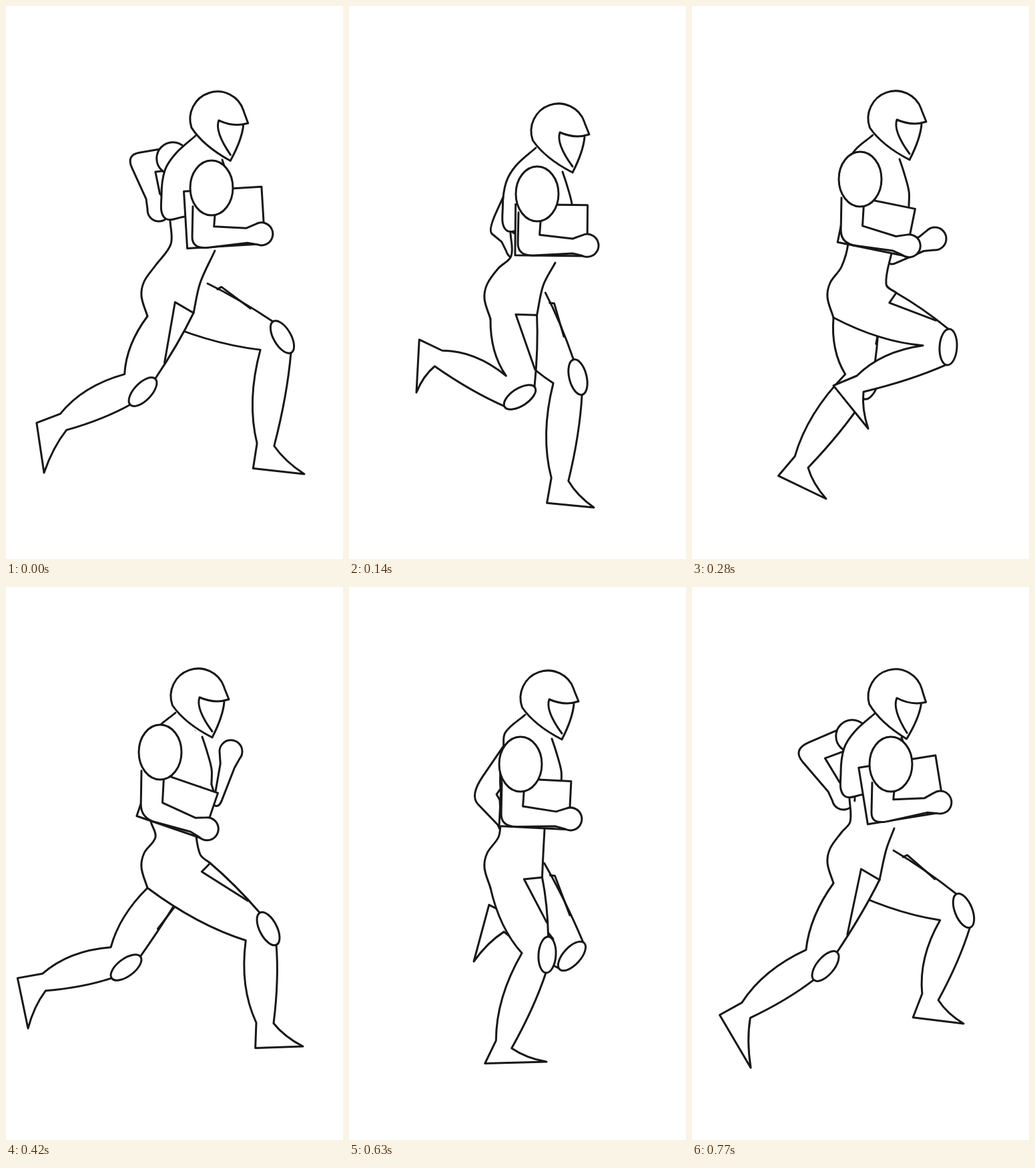
An HTML page with a canvas that plays this animation: 505 by 827 pixels, repeating every 0.84 s.

```html
<!DOCTYPE html>
<html lang="en">
<head>
<meta charset="utf-8">
<title>Run cycle</title>
<style>
html, body { margin: 0; width: 100%; height: 100%; overflow: hidden; background: #fff; }
canvas { display: block; width: 505px; height: 827px; }
</style>
</head>
<body>
<canvas id="stage" width="505" height="827"></canvas>
<script>
const STEP = 70, COUNT = 12, HIP_X = 253;
const ctx = document.getElementById('stage').getContext('2d');

// Key joints by step of the cycle; each leg is knee pad, ankle, toe.
const KEYS = {
  0: { head: [318, 128], shoulder: [308, 272], swing: -.06, hipY: 434, elbow: [203, 236], fist: [229, 305],
    near: [[205, 577], [86, 622], [57, 698]], far: [[414, 495], [389, 656], [447, 700]] },
  2: { head: [314, 146], shoulder: [282, 281], swing: .01, hipY: 438, elbow: [228, 333], fist: [252, 362],
    near: [[256, 585], [134, 527], [101, 578]], far: [[343, 555], [316, 708], [367, 750]] },
  4: { head: [305, 127], shoulder: [252, 259], swing: .2, hipY: 436, elbow: [300, 370], fist: [364, 348],
    near: [[384, 510], [252, 565], [264, 632]], far: [[266, 562], [164, 682], [201, 737]] },
  6: { head: [288, 122], shoulder: [231, 247], swing: .33, hipY: 420, elbow: [314, 325], fist: [337, 246],
    near: [[393, 511], [388, 652], [445, 687]], far: [[180, 569], [57, 591], [33, 660]] },
  7: { head: [292, 130], shoulder: [238, 256], swing: .29, hipY: 427, elbow: [290, 340], fist: [337, 304],
    near: [[373, 537], [389, 690], [458, 704]], far: [[216, 588], [90, 528], [48, 569]] },
  9: { head: [298, 125], shoulder: [257, 265], swing: .05, hipY: 420, elbow: [202, 311], fist: [246, 365],
    near: [[297, 550], [232, 684], [296, 710]], far: [[334, 552], [238, 504], [187, 560]] },
  11: { head: [308, 123], shoulder: [298, 265], swing: -.16, hipY: 413, elbow: [176, 250], fist: [227, 316],
    near: [[200, 567], [81, 633], [88, 719]], far: [[407, 484], [357, 613], [407, 653]] }
};

const clamp = v => Math.min(1, Math.max(0, v));
const add = (a, b, k = 1) => [a[0] + b[0] * k, a[1] + b[1] * k];
const toward = (a, b) => {
  const d = add(b, a, -1), len = Math.hypot(...d) || 1;
  return [d[0] / len, d[1] / len];
};
const unit = v => toward([0, 0], v);
const clockwise = ([x, y]) => [-y, x];
const forward = ([x, y]) => [y, -x];
const lerp = (a, b, t) => add(a, add(b, a, -1), t);
const turn = ([x, y], r) => [x * Math.cos(r) - y * Math.sin(r), x * Math.sin(r) + y * Math.cos(r)];
const halfway = (a, b) => Array.isArray(a) ? lerp(a, b, .5) : (a + b) / 2;

// Steps without keys: the body is halfway, the legs mirror the opposite step.
function poseAt(i) {
  if (KEYS[i]) return KEYS[i];
  const a = KEYS[i - 1], b = KEYS[(i + 1) % COUNT], mirror = KEYS[(i + COUNT / 2) % COUNT];
  const pose = {};
  for (const part of ['head', 'shoulder', 'swing', 'hipY', 'elbow', 'fist']) pose[part] = halfway(a[part], b[part]);
  const shift = [0, pose.hipY - mirror.hipY];
  pose.near = mirror.far.map(p => add(p, shift));
  pose.far = mirror.near.map(p => add(p, shift));
  return pose;
}

function paint(path) {
  ctx.fill(path);
  ctx.stroke(path);
}

function curve(path, pts) {
  pts.forEach((p, i) => {
    if (!i) return path.lineTo(...p);
    const prev = pts[i - 1], len = Math.hypot(...add(p, prev, -1)) * .33;
    const out = toward(pts[i - 2] || prev, p), into = toward(prev, pts[i + 1] || p);
    path.bezierCurveTo(...add(prev, out, len), ...add(p, into, -len), ...p);
  });
  return path;
}

// Line that bows sideways by h.
function bow(path, a, b, h) {
  path.quadraticCurveTo(...add(lerp(a, b, .45), clockwise(toward(a, b)), 2 * h), ...b);
}

// White area between two sides; only the sides are inked.
function panel(back, front) {
  ctx.fill(curve(curve(new Path2D(), back), [...front].reverse()));
  ctx.stroke(curve(new Path2D(), back));
  ctx.stroke(curve(new Path2D(), front));
}

function oval(center, rx, ry, angle = 0) {
  const path = new Path2D();
  path.ellipse(...center, rx, ry, angle, 0, 7);
  paint(path);
}

function groin(knee, hipY) {
  const lead = clamp((knee[0] - HIP_X) / 130);
  return { lead, at: [281 + 25 * lead, hipY + 25 - 32 * lead] };
}

function leg([knee, ankle, toe], hipY, isNear) {
  const thigh = toward([HIP_X, hipY], knee), shin = toward(knee, ankle);
  const along = unit(add(thigh, shin)), out = forward(along), side = forward(shin);
  const { lead, at } = groin(knee, hipY);
  const top = isNear ? at : add(at, [-4, -12]);
  const seat = [212, hipY + 30];
  const padTop = add(knee, along, -26), padEnd = add(knee, along, 26);
  const kneeBack = add(knee, out, -38);
  const instep = add(ankle, side, 13), achilles = add(ankle, side, -13);
  const heel = add(achilles, shin, 38);

  const path = new Path2D();
  path.moveTo(...top);
  bow(path, top, padTop, -2);
  path.lineTo(...padEnd);
  bow(path, padEnd, instep, -3);
  bow(path, instep, toe, 3);
  path.lineTo(...heel);
  path.lineTo(...achilles);
  bow(path, achilles, kneeBack, -9);
  bow(path, kneeBack, seat, -7);
  paint(path);

  const edge = toward(top, padTop), strap = new Path2D();
  if (isNear) {
    strap.moveTo(...top);
    strap.lineTo(...add(top, clockwise(edge), 32 - 14 * lead));
    strap.lineTo(...lerp(top, padTop, .75));
  } else {
    strap.moveTo(...lerp(top, padTop, .15));
    strap.lineTo(...add(lerp(top, padTop, .18), forward(edge), 6));
    strap.lineTo(...lerp(top, padTop, .65));
  }
  ctx.stroke(strap);
  oval(knee, 27, 13, Math.atan2(along[1], along[0]));
}

function arm(shoulder, elbow, fist) {
  const upper = toward(shoulder, elbow), lower = toward(elbow, fist);
  const n = clockwise(upper), m = clockwise(lower), sum = add(n, m);
  const miter = Math.min(17 / (1 + n[0] * m[0] + n[1] * m[1]), 22);
  const outer = add(elbow, sum, miter), inner = add(elbow, sum, -miter * .9);
  const angle = Math.atan2(lower[1], lower[0]), wrist = add(fist, lower, -22);
  const path = new Path2D();
  path.moveTo(...add(shoulder, n, 17));
  path.lineTo(...lerp(outer, add(shoulder, n, 17), .3));
  path.quadraticCurveTo(...outer, ...lerp(outer, add(wrist, m, 12), .3));
  path.lineTo(...add(wrist, m, 12));
  path.arc(...fist, 17, angle + 2, angle - 2, true);
  path.lineTo(...add(wrist, m, -10));
  path.lineTo(...inner);
  path.lineTo(...add(shoulder, n, -17));
  paint(path);
}

function box(center, angle, w, h) {
  const path = new Path2D();
  for (const [x, y] of [[-1, -1], [1, -1], [1, 1], [-1, 1]]) {
    path.lineTo(...add(center, turn([x * w / 2, y * h / 2], angle)));
  }
  path.closePath();
  paint(path);
}

function helmet([x, y], tilt) {
  const path = new Path2D();
  path.moveTo(21, 103);
  path.quadraticCurveTo(-20, 82, -38.6, 55);
  path.arc(0, 41, 41, 2.8, 6);
  path.lineTo(46, 46);
  path.quadraticCurveTo(25, 53, 2, 43);
  path.quadraticCurveTo(-4, 60, 21, 94);
  path.moveTo(39, 50);
  path.quadraticCurveTo(37, 72, 21, 103);
  ctx.save();
  ctx.translate(x, y);
  ctx.rotate(tilt);
  paint(path);
  ctx.restore();
}

function runner({ head, shoulder, swing, hipY, elbow, fist, near, far }) {
  const twist = shoulder[0] - head[0], open = clamp((twist + 42) / 33);
  const fromHead = (x, y) => add(head, [x, y]);

  const farShoulder = fromHead(-78 - twist, 100);
  arm(farShoulder, elbow, fist);
  if (open > .5) oval(farShoulder, 25 * open, 25 * open);
  leg(far, hipY, false);

  panel(
    [fromHead(-72, 193), fromHead(-71, 228), [224, hipY - 46], [207, hipY - 22], [203, hipY], [212, hipY + 30]],
    [fromHead(-5, 238), [291, hipY - 20], groin(near[0], hipY).at]);
  const width = 70 + 15 * clamp(open * 3);
  panel(
    [[-34, 66], [-64, 93], [5 - width, 118], [-width, 155], [5 - width, 189], [-50, 187]].map(p => add(head, p)),
    [[6, 102], [12, 120], [20, 150], [20, 172]].map(p => add(head, p)));
  leg(near, hipY, true);

  const bend = add(shoulder, [-12, 76 + 32 * swing]);
  box(add(bend, turn([33, -20 - 8 * open], swing)), swing, 104 + 13 * open, 72 + 14 * open);
  arm(add(shoulder, [-11, 28]), bend, add(bend, turn([87, 0], swing)));
  oval(shoulder, 32, 41);
  helmet(head, .45 * Math.max(0, -swing));
}

const poses = Array.from({ length: COUNT }, (_, i) => poseAt(i));

function draw() {
  ctx.fillStyle = '#fff';
  ctx.fillRect(0, 0, 505, 827);
  ctx.strokeStyle = '#171717';
  ctx.lineWidth = 3;
  ctx.lineCap = ctx.lineJoin = 'round';
  runner(poses[Math.floor(performance.now() / STEP) % COUNT]);
  requestAnimationFrame(draw);
}
draw();
</script>
</body>
</html>
```
